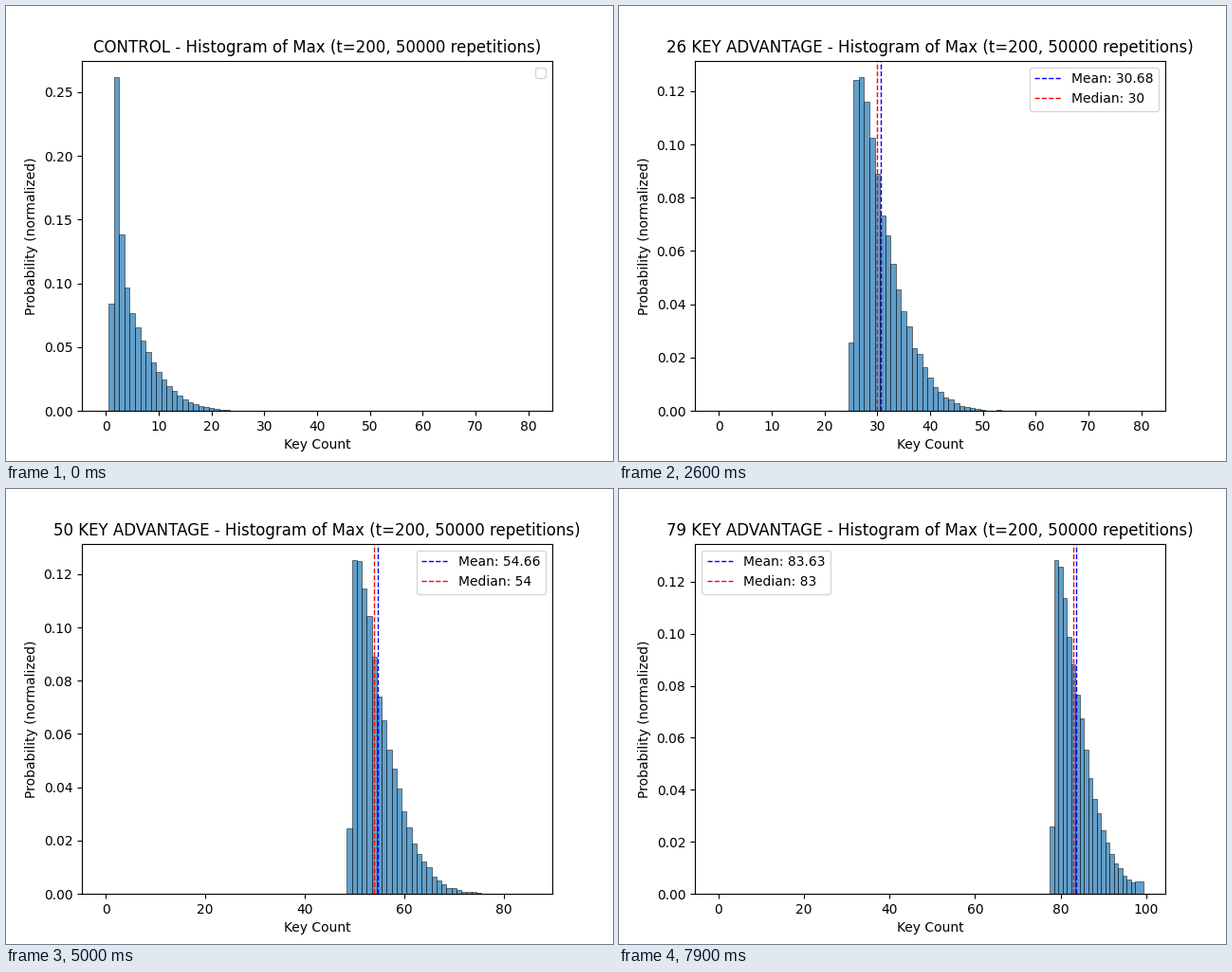
A matplotlib script for the animation above (8 s loop, 640 by 480 pixels).

```python
import numpy as np
import matplotlib.pyplot as plt
from matplotlib.animation import FuncAnimation

FRAMES = 80
REPS = 50000
SIZE = 130
CAP = 99
LOW = np.array([0, .084, .2614, .138, .0965])  # control odds of the smallest maxima
x = np.arange(SIZE)


def expected(k):
    """Probability of each maximum for an advantage of k keys."""
    r = x - k
    n = np.maximum(r - 1, 0)
    p = np.where((r >= 0) & (r <= 35), .126 * np.exp(-.1 * n - .0062 * n**2), 0)
    p[r == -1] = .025
    # near zero the small maxima pile up, less so with every extra key
    w = max(0, 1 - .27 * k)
    p[:5] = (1 - w) * p[:5] + w * (1 - p[5:].sum()) * LOW / LOW.sum()
    return p / p.sum()


def simulate(k):
    p = expected(k)
    if k:
        p = np.random.default_rng(k).multinomial(REPS, p) / REPS
    mean = (p * np.minimum(x, CAP)).sum()
    median = int(np.searchsorted(np.cumsum(p), .5))
    return p, mean, median


def bins(p, top):
    """Left edges, widths and densities of the bars."""
    left, width, height = x - .5, np.ones(SIZE), p.copy()
    if top == CAP:
        # the last bin is two keys wide and holds the capped tail
        height[CAP - 1] = p[CAP - 1:].sum() / 2
        height[CAP:] = 0
        width[CAP - 1] = 2
    on = height > 0
    return left[on], width[on], height[on]


fig, ax = plt.subplots(figsize=(6.4, 4.8), dpi=100)


def draw(k):
    p, mean, median = simulate(k)
    top = min(max(80, k + 35), CAP)
    left, width, height = bins(p, top)

    ax.clear()
    ax.bar(left, height, width, align="edge",
           alpha=.7, edgecolor="black", linewidth=.5)
    pad = .05 * (top + 1)
    ax.set_xlim(-.5 - pad, top + .5 + pad)
    ax.set_ylim(0, 1.05 * height.max())
    ax.set_xlabel("Key Count")
    ax.set_ylabel("Probability (normalized)")
    name = f"{k} KEY ADVANTAGE" if k else "CONTROL"
    ax.set_title(f"{name} - Histogram of Max (t=200, {REPS} repetitions)")

    lines = []
    if k:
        for value, color, label in ((mean, "blue", f"Mean: {mean:.2f}"),
                                    (median, "red", f"Median: {median}")):
            lines.append(ax.axvline(value, color=color, ls="--", lw=1, label=label))
    ax.legend(handles=lines)


anim = FuncAnimation(fig, draw, frames=FRAMES, interval=100,
                     init_func=lambda: None, repeat=True, repeat_delay=0)
plt.show()
```
